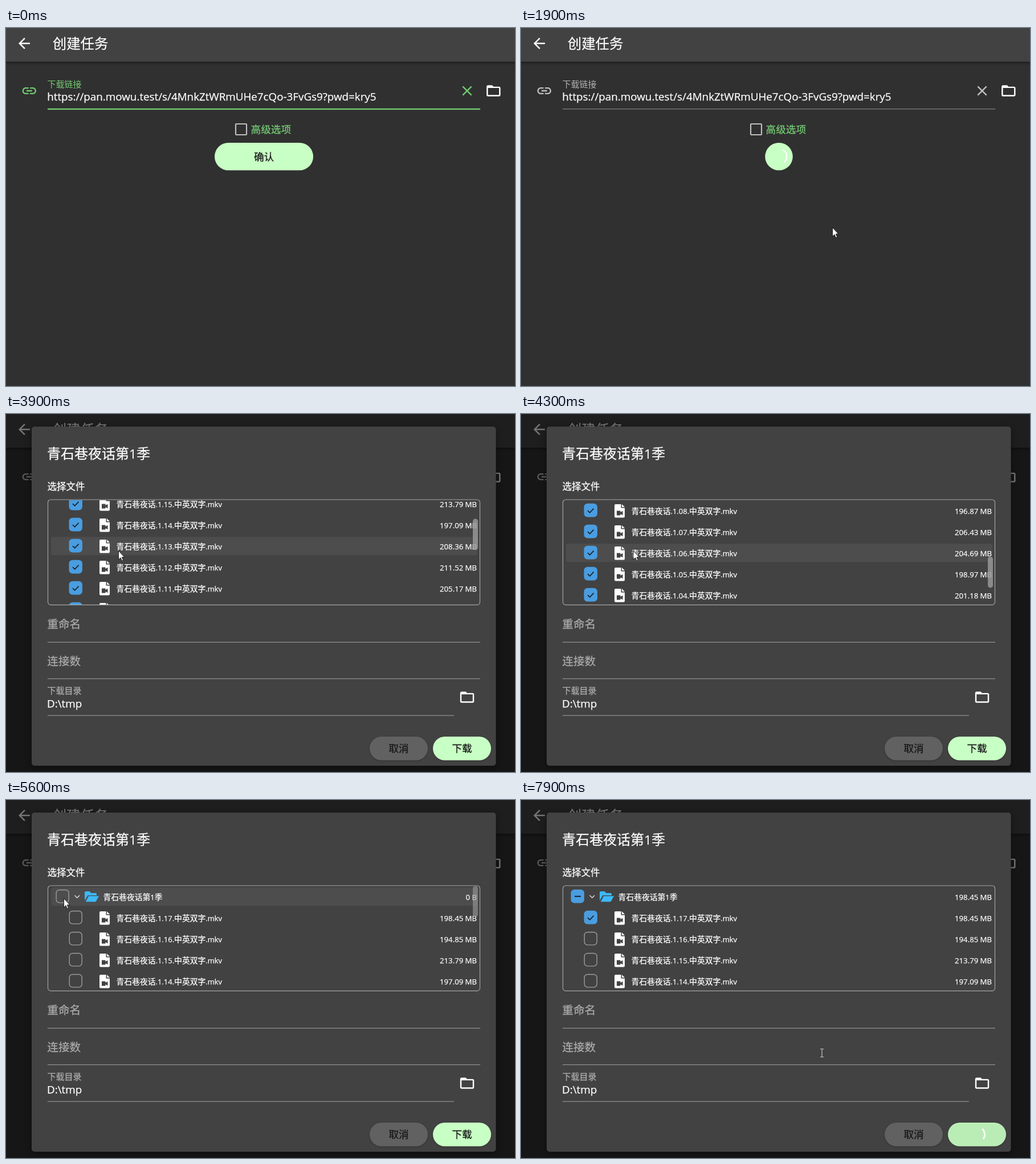
Animation, 893 px wide and 627 px high, one loop 8000 ms. Source, as an HTML page:

```html
<!DOCTYPE html>
<html lang="zh-CN">
<head>
<meta charset="utf-8">
<title>创建任务</title>
<style>
html, body { margin: 0; width: 100%; height: 100%; overflow: hidden; background: #303030; }
svg { display: block; width: 100vw; height: 100vh; }
text { font-family: "Noto Sans CJK SC", "Noto Sans CJK", "Noto Sans", sans-serif; white-space: pre; stroke-width: .25; }
tspan { font-family: "Open Sans", "Noto Sans", sans-serif; }
.lift { filter: drop-shadow(0 1.5px 1.5px rgba(0, 0, 0, .25)); }
</style>
</head>
<body>
<svg id="stage" viewBox="0 0 893 627">
  <defs><clipPath id="listClip"><rect x="74" y="151" width="757" height="183" rx="4"/></clipPath></defs>
</svg>
<script>
const stage = document.getElementById('stage');
const LOOP = 8000, STEP = 100, PITCH = 37, ROW0 = 169.5;
const SHOW = '青石巷夜话';
const LINK = 'https://pan.mowu.test/s/4MnkZtWRmUHe7cQo-3FvGs9?pwd=kry5';
const SIZES = ['198.45', '194.85', '213.79', '197.09', '208.36', '211.52', '205.17', '209.94', '212.08',
  '196.87', '206.43', '204.69', '198.97', '201.18', '207.75', '210.61', '203.85'];

const ICON = {
  back: 'M20 11H7.83l5.59-5.59L12 4l-8 8 8 8 1.41-1.41L7.83 13H20z',
  link: 'M3.9 12c0-1.71 1.39-3.1 3.1-3.1h4V7H7c-2.76 0-5 2.24-5 5s2.24 5 5 5h4v-1.9H7c-1.71 0-3.1-1.39-3.1-3.1zM8 13h8v-2H8zm9-6h-4v1.9h4c1.71 0 3.1 1.39 3.1 3.1s-1.39 3.1-3.1 3.1h-4V17h4c2.76 0 5-2.24 5-5s-2.24-5-5-5z',
  close: 'M19 6.41L17.59 5 12 10.59 6.41 5 5 6.41 10.59 12 5 17.59 6.41 19 12 13.41 17.59 19 19 17.59 13.41 12z',
  folder: 'M20 6h-8l-2-2H4c-1.1 0-2 .9-2 2v12c0 1.1.9 2 2 2h16c1.1 0 2-.9 2-2V8c0-1.1-.9-2-2-2zm0 12H4V8h16z'
};

// ---- building helpers ----
function el(parent, tag, attrs = {}) {
  const node = document.createElementNS('http://www.w3.org/2000/svg', tag);
  set(node, attrs);
  parent.appendChild(node);
  return node;
}
function set(node, attrs) {
  for (const k in attrs) node.setAttribute(k, attrs[k]);
}
const group = (parent, attrs) => el(parent, 'g', attrs);
const rect = (parent, x, y, width, height, rx, attrs) => el(parent, 'rect', { x, y, width, height, rx, ...attrs });
const path = (parent, d, attrs) => el(parent, 'path', { d, ...attrs });
const hline = (parent, x1, x2, y, fill = '#929292') => rect(parent, x1, y, x2 - x1, 1.2, 0, { fill });

// Latin runs are set a little smaller than the Chinese around them.
function label(parent, x, y, size, str, fill, attrs = {}) {
  const node = el(parent, 'text', { x, y, 'font-size': size, fill, stroke: fill, ...attrs });
  fillText(node, str, size);
  return node;
}
function fillText(node, str, size) {
  node.textContent = '';
  for (const run of str.match(/[\x20-\x7e]+|[^\x20-\x7e]+/g)) {
    if (run.charCodeAt(0) > 126) node.appendChild(document.createTextNode(run));
    else el(node, 'tspan', { 'font-size': size * 0.94 }).textContent = run;
  }
}
function icon(parent, name, cx, cy, scale, fill) {
  return path(parent, ICON[name], { fill, transform: `translate(${cx - 12 * scale} ${cy - 12 * scale}) scale(${scale})` });
}
function checkbox(parent, x, cy) {
  const box = rect(parent, x + .7, cy - 12, 22, 22.4, 5.5, { 'stroke-width': 1.4 });
  const tick = path(parent, `M${x + 6.5} ${cy - .3}l3.7 3.7 6.8 -7.2`, { fill: 'none', stroke: '#16222c', 'stroke-width': 1.7 });
  const dash = rect(parent, x + 6.5, cy - 1.7, 11, 2, 0, { fill: '#16222c' });
  return state => {
    set(box, { fill: state ? '#4a9de0' : 'none', stroke: state ? '#4a9de0' : '#9c9c9c' });
    set(tick, { opacity: state === 'on' ? 1 : 0 });
    set(dash, { opacity: state === 'part' ? 1 : 0 });
  };
}
function videoFile(parent, cy) {
  const g = group(parent, { transform: `translate(164 ${cy - 11.5})` });
  path(g, 'M2 0H11.5V6.5H18V21.5Q18 23.5 16 23.5H2Q0 23.5 0 21.5V2Q0 0 2 0ZM13 0L18 5H13Z', { fill: '#fff' });
  path(g, 'M4 11.5H10.5V14L14.5 11.8V19.2L10.5 17V19.5H4Z', { fill: '#424242' });
}

// ---- page behind ----
const page = group(stage);
rect(page, 0, 0, 893, 627, 0, { fill: '#303030' });
rect(page, -10, -10, 913, 69, 0, { fill: '#424242', style: 'filter:drop-shadow(0 2px 2.5px rgba(0,0,0,.45))' });
icon(page, 'back', 32, 27, 1.25, '#fff');
label(page, 81.8, 36, 24.4, '创建任务', '#fff');
const linkIcon = icon(page, 'link', 40.8, 110, 1.22);
const linkLabel = label(page, 72.5, 104.2, 15, '下载链接', '#b0b0b0', { stroke: 'none' });
label(page, 72.3, 127, 20, LINK, '#fff');
const clearIcon = icon(page, 'close', 809, 110, 1.22);
icon(page, 'folder', 855.3, 110, 1.22, '#fff');
const underline = rect(page, 73, 141, 759, 1, 0);
rect(page, 403, 168, 19, 19, 1, { fill: 'none', stroke: '#bdbdbd', 'stroke-width': 2.2 });
label(page, 429.6, 184.2, 17.6, '高级选项', '#74cb74');
const confirm = rect(page, 366, 201, 173, 48.3, 24.15, { fill: '#c8ffc4' });
const confirmText = label(page, 452.5, 232, 17.6, '确认', '#161616', { 'text-anchor': 'middle' });
const spinAttrs = { fill: 'none', stroke: '#fff', 'stroke-width': 2.4 };
const confirmSpin = path(page, '', spinAttrs);
const barrier = rect(stage, 0, 0, 893, 627, 0, { fill: '#000' });

// ---- dialog ----
const dialog = group(stage);
rect(dialog, 45, 22, 814.5, 594, 5, { fill: '#424242', style: 'filter:drop-shadow(0 3px 6px rgba(0,0,0,.4))' });
label(dialog, 72, 78, 24, SHOW + '第1季', '#fff', { 'font-weight': 500 });
label(dialog, 72.5, 133.2, 16.5, '选择文件', '#fff');

const list = group(dialog, { 'clip-path': 'url(#listClip)' });
const rows = group(list);
const hover = rect(rows, 79, 0, 748, 32, 4, { fill: '#4d4d4d' });
const sizeAt = (cy, str) => label(rows, 826, cy + 5, 14, str, '#fff', { 'text-anchor': 'end' });

const headBox = checkbox(rows, 87.5, ROW0);
path(rows, `M120.5 ${ROW0 - 2.5}l4.3 4.3 4.3-4.3`, { fill: 'none', stroke: '#ddd', 'stroke-width': 1.4 });
path(rows, 'M138 176V162Q138 160 140 160H146.5L149.5 163H157Q159 163 159 165V167H143.5ZM139.8 178.2L145 168.3H163L158 177.2Q157.4 178.2 156 178.2Z', { fill: '#3db8fa' });
label(rows, 170.5, ROW0 + 5.3, 13.8, SHOW + '第1季', '#fff');
const headSize = sizeAt(ROW0, '3.40 GB');

const boxes = SIZES.map((mb, i) => {
  const cy = ROW0 + (i + 1) * PITCH, no = String(17 - i).padStart(2, '0');
  const box = checkbox(rows, 110.5, cy);
  videoFile(rows, cy);
  label(rows, 193.5, cy + 5.3, 13.8, `${SHOW}.1.${no}.中英双字.mkv`, '#fff');
  sizeAt(cy, mb + ' MB');
  return box;
});
const thumb = rect(list, 819, 150.5, 9, 54.5, 4.5, { fill: '#9a9a9a', 'fill-opacity': .82 });
rect(dialog, 73.5, 150, 758, 184.3, 5, { fill: 'none', stroke: '#a3a3a3', 'stroke-width': 1.2 });

label(dialog, 72.3, 375, 19.6, '重命名', '#acacac');
hline(dialog, 73, 832, 399);
label(dialog, 72.3, 440, 19.6, '连接数', '#acacac');
hline(dialog, 73, 832, 463);
label(dialog, 72.5, 490.2, 15, '下载目录', '#acacac');
label(dialog, 72, 514, 20, 'D:\\tmp', '#fff');
hline(dialog, 73, 786, 527.4);
icon(dialog, 'folder', 809, 496, 1.22, '#fff');
rect(dialog, 638, 565, 102, 41.5, 20.75, { fill: '#616161', class: 'lift' });
label(dialog, 689, 592.3, 17.6, '取消', '#161616', { 'text-anchor': 'middle' });
rect(dialog, 749, 565, 102, 41.5, 20.75, { fill: '#c8ffc4', class: 'lift' });
const shade = rect(dialog, 749, 565, 102, 41.5, 20.75, { fill: '#000' });
const getText = label(dialog, 800, 592.3, 17.6, '下载', '#161616', { 'text-anchor': 'middle' });
const getSpin = path(dialog, '', spinAttrs);

// ---- pointer ----
const arrow = path(stage, 'M.5 .5V16L4 12.7 6.4 18.2 8.7 17.2 6.4 11.8H11Z', { fill: '#fff', stroke: '#111', 'stroke-width': .9 });
const beam = path(stage, 'M-3 -7H-.8L0 -6.4.8 -7H3M0 -6.4V6.4M-3 7H-.8L0 6.4.8 7H3', { fill: 'none', stroke: '#d0d0d0', 'stroke-width': 1.1 });

// ---- motion tables: time, value(s) ----
const POINTER = [
  [100, 638, 368], [200, 612, 378], [300, 592, 384], [400, 592, 384], [700, 520, 300], [1000, 478, 232],
  [1100, 478, 232], [1200, 505, 276], [1300, 546, 349], [3300, 546, 349], [3500, 440, 310], [3800, 197, 239],
  [5100, 196, 239], [5400, 101, 172], [5600, 101, 172], [5900, 118, 200], [6100, 118, 200], [6300, 122, 206],
  [6500, 129, 231], [6700, 480, 420], [6900, 786, 577], [7300, 792, 590], [7600, 792, 590], [7900, 528, 443]
];
const WIDTH = [[1200, 173], [1300, 135], [1400, 92], [1500, 62], [1600, 48.5]];
const SCROLL = [[0, 0], [3900, 123], [4100, 246], [4300, 370], [4400, 482], [4800, 359], [4900, 123], [5000, 0]];

const clamp = v => Math.max(0, Math.min(1, v));
const ramp = (t, a, b) => clamp((t - a) / (b - a));
function tween(table, t, col = 1) {
  const i = table.findIndex(k => k[0] > t);
  if (i < 0) return table[table.length - 1][col];
  if (i === 0) return table[0][col];
  const a = table[i - 1], b = table[i];
  return a[col] + (b[col] - a[col]) * ramp(t, a[0], b[0]);
}
const held = (table, t) => table.filter(k => k[0] <= t).pop()[1];

// Bezier ease (.4, 0, .2, 1)
function ease(x) {
  let lo = 0, hi = 1;
  for (let i = 0; i < 20; i++) {
    const u = (lo + hi) / 2, v = 1 - u;
    if (3 * v * v * u * .4 + 3 * v * u * u * .2 + u * u * u < x) lo = u; else hi = u;
  }
  return 3 * (1 - lo) * lo * lo + lo * lo * lo;
}
function spin(node, cx, cy, ms, turn) {
  if (ms <= 0) return set(node, { d: '' });
  const p = ms / 1333 % 1, r = 13.6;
  const head = ease(clamp(p * 2)), tail = ease(clamp(p * 2 - 1));
  const start = turn - 90 + tail * 270 + ms / 2222 * 360 + p * 90;
  const sweep = Math.max(2, (head - tail) * 270);
  const at = deg => {
    const a = deg * Math.PI / 180;
    return `${(cx + r * Math.cos(a)).toFixed(2)} ${(cy + r * Math.sin(a)).toFixed(2)}`;
  };
  set(node, { d: `M${at(start)}A${r} ${r} 0 ${sweep > 180 ? 1 : 0} 1 ${at(start + sweep)}` });
}

let shownSize = '3.40 GB';
function render(t) {
  const px = tween(POINTER, t, 1), py = tween(POINTER, t, 2);

  const focus = t < 1100, green = '#72c972';
  for (const n of [linkIcon, clearIcon]) set(n, { fill: focus ? green : '#c0c0c0' });
  set(linkLabel, { fill: focus ? green : '#b0b0b0' });
  set(underline, { fill: focus ? green : '#8c8c8c', y: focus ? 140.8 : 141.3, height: focus ? 2.4 : 1.1 });

  const w = tween(WIDTH, t);
  set(confirm, { x: 452.5 - w / 2, width: w });
  set(confirmText, { opacity: 1 - ramp(t, 1100, 1400) });
  spin(confirmSpin, 452.5, 225.2, t - 1690, -20);

  const k = 1 - (1 - ramp(t, 2200, 2900)) ** 2;
  set(barrier, { opacity: .54 * k });
  set(dialog, { opacity: k });

  const scroll = held(SCROLL, t);
  set(rows, { transform: `translate(0 ${-scroll})` });
  const over = t >= 3400 && px > 79 && px < 828 && py > 151 && py < 334;
  const row = Math.floor((py - 151 + scroll) / PITCH);
  set(hover, { y: ROW0 - 16.3 + row * PITCH, opacity: over ? 1 : 0 });
  set(thumb, { y: 150.5 + scroll / 482 * 129.5, opacity: t < 3900 ? 0 : 1 - ramp(t, 5500, 5900) });

  const all = t < 5500, one = t >= 6100;
  headBox(all ? 'on' : one ? 'part' : '');
  boxes.forEach((box, i) => box(all || one && i === 0 ? 'on' : ''));
  const size = all ? '3.40 GB' : one ? SIZES[0] + ' MB' : '0 B';
  if (size !== shownSize) fillText(headSize, shownSize = size, 14);

  set(shade, { opacity: .07 * ramp(t, 6900, 7300) });
  set(getText, { opacity: t < 7700 ? 1 : 0 });
  spin(getSpin, 800, 586, t - 7715, 0);

  const typing = t >= 7900;
  set(arrow, { transform: `translate(${px} ${py})`, opacity: t >= 100 && !typing ? 1 : 0 });
  set(beam, { transform: `translate(${px} ${py})`, opacity: typing ? 1 : 0 });
}

const began = performance.now();
function tick() {
  const t = (performance.now() - began) % LOOP;
  render(Math.floor(t / STEP) * STEP);
  requestAnimationFrame(tick);
}
tick();
</script>
</body>
</html>
```
